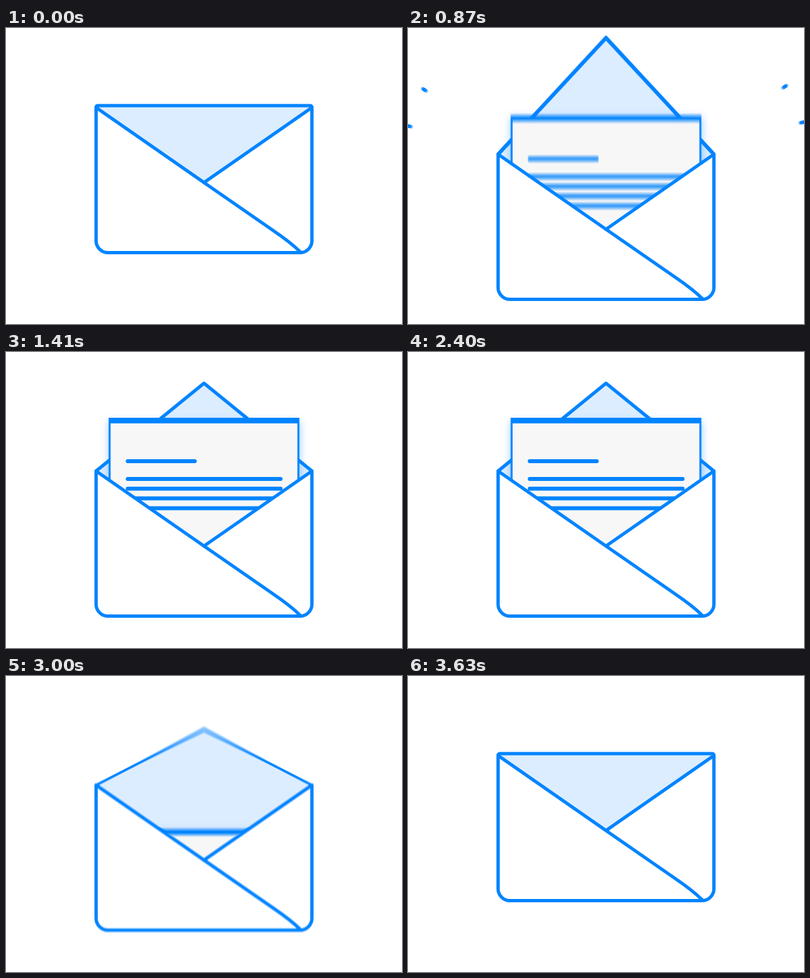
Recreate the animation shown at these times as an HTML page with a canvas. Size 600 by 450 pixels, loop 4.14 s.

```html
<!DOCTYPE html>
<html lang="en">
<head>
<meta charset="utf-8">
<title>Opening envelope</title>
<style>
  html, body { margin: 0; width: 100%; height: 100%; overflow: hidden; background: #fff; }
  canvas { display: block; width: 600px; height: 450px; }
</style>
</head>
<body>
<canvas id="stage" width="600" height="450"></canvas>
<script>
const LOOP = 4140, STEP = 30, SHUTTER = 15, SAMPLES = 12;
const BLUE = '#0084ff', LIGHT = [220, 237, 255], PAPER = '#f7f7f7';
const LEFT = 136.5, RIGHT = 463.5, HINGE = 121, FOLD = 235, BOTTOM = 341.5, RADIUS = 18;

const screen = document.getElementById('stage').getContext('2d');
const buffer = document.createElement('canvas');
buffer.width = 600;
buffer.height = 450;
const ctx = buffer.getContext('2d');

const clamp = v => Math.max(0, Math.min(1, v));
const smooth = u => u * u * (3 - 2 * u);

// Eased interpolation through [time, value] keys
function track(keys, t) {
  if (t <= keys[0][0]) return keys[0][1];
  for (let i = 1; i < keys.length; i++) {
    const [t0, a] = keys[i - 1], [t1, b] = keys[i];
    if (t < t1) return a + (b - a) * smooth((t - t0) / (t1 - t0));
  }
  return keys[keys.length - 1][1];
}

const envelopeKeys = [[0, 0], [367, -11], [867, 71], [1400, 60],
                      [2400, 60], [2812, 71], [3312, -11], [3630, 0]];
const flapKeys = [[420, -114], [885, 178], [1300, 133.5],
                  [2400, 133.5], [2815, 178], [3305, -114]];
const letterKeys = [[520, 260], [987, 30], [1400, 44],
                    [2400, 44], [2701, 30], [3168, 260]];

function stroke(width, color = BLUE) {
  ctx.lineWidth = width;
  ctx.strokeStyle = color;
  ctx.stroke();
}

function line(x1, y1, x2, y2, width) {
  ctx.beginPath();
  ctx.moveTo(x1, y1);
  ctx.lineTo(x2, y2);
  stroke(width);
}

function drawSparks(t) {
  const u = (t - 570) / 540;
  if (u <= 0 || u >= 1) return;
  const out = 1 - (1 - u) ** 3;
  const ray = (cy, side, slope, base) => {
    const n = Math.hypot(1, slope), dx = side / n, dy = -slope / n;
    const head = base + 220 * out, tail = head - 48 * (1 - out);
    line(300 + dx * tail, cy + dy * tail, 300 + dx * head, cy + dy * head, 5.5);
  };
  ray(270, -1, 0.64, 128);
  ray(268, 1, 0.66, 126);
  ray(215, -1, 0.22, 107);
  ray(209, 1, 0.22, 106);
}

function drawFlap(height) {
  const closed = clamp(-height / 114);
  const tint = closed > 0 ? 0.35 + 0.65 * closed : 1;
  ctx.fillStyle = `rgb(${LIGHT.map(c => 255 + (c - 255) * tint)})`;
  if (closed > 0) ctx.fillRect(LEFT, 118, RIGHT - LEFT, 4);
  ctx.save();
  ctx.translate(0, HINGE);
  ctx.scale(1, height / 133.5 || 0.001);
  ctx.beginPath();
  ctx.moveTo(LEFT, 0);
  ctx.lineTo(300, -133.5);
  ctx.lineTo(RIGHT, 0);
  ctx.fill();
  stroke(5);
  ctx.restore();
}

function drawTopEdge(height) {
  ctx.beginPath();
  ctx.moveTo(LEFT, 122);
  ctx.arcTo(LEFT, 118, 300, 118, 2.5);
  ctx.arcTo(RIGHT, 118, RIGHT, 122, 2.5);
  ctx.lineTo(RIGHT, 122);
  stroke(3 + 2 * clamp(-height / 114));
}

function drawLetter(top) {
  ctx.save();
  ctx.beginPath();
  ctx.rect(0, -200, 600, 500);
  ctx.clip();
  ctx.translate(0, top);
  ctx.shadowColor = 'rgba(0,132,255,.4)';
  ctx.shadowBlur = 12;
  ctx.shadowOffsetY = 6;
  ctx.fillStyle = BLUE;
  ctx.fillRect(155.5, -4, 289, 260);
  ctx.shadowColor = 'transparent';
  ctx.fillStyle = PAPER;
  ctx.fillRect(158.5, 4.5, 283, 252);
  line(184.5, 62, 286, 62, 6);
  for (let i = 0; i < 4; i++) line(184.5, 89 + i * 14.8, 416, 89 + i * 14.8, 6);
  ctx.restore();
}

function drawBody() {
  ctx.beginPath();
  ctx.moveTo(LEFT, HINGE);
  ctx.arcTo(LEFT, BOTTOM, 300, BOTTOM, RADIUS);
  ctx.arcTo(RIGHT, BOTTOM, RIGHT, HINGE, RADIUS);
  ctx.lineTo(RIGHT, HINGE);
  ctx.lineTo(300, FOLD);
  ctx.closePath();
  ctx.fillStyle = '#fff';
  ctx.fill();
  stroke(5);
  ctx.beginPath();
  ctx.moveTo(300, FOLD);
  ctx.lineTo(405, 308);
  ctx.quadraticCurveTo(432, 326.5, 446, 340.5);
  stroke(5);
}

function drawScene(t) {
  const flap = track(flapKeys, t);
  ctx.fillStyle = '#fff';
  ctx.fillRect(0, 0, 600, 450);
  ctx.lineCap = ctx.lineJoin = 'round';
  drawSparks(t);

  ctx.save();
  ctx.translate(0, track(envelopeKeys, t));
  if (flap >= 0) drawFlap(flap);
  ctx.beginPath();
  ctx.moveTo(LEFT, HINGE);
  ctx.lineTo(RIGHT, HINGE);
  ctx.lineTo(300, FOLD);
  ctx.fillStyle = `rgb(${LIGHT})`;
  ctx.fill();
  drawLetter(track(letterKeys, t));
  if (flap < 0) drawFlap(flap);
  drawBody();
  if (flap < 0) drawTopEdge(flap);
  ctx.restore();
}

// Averages several moments within the shutter to give motion blur
function render(t) {
  const moving = (t > 0 && t < 1410) || (t > 2400 && t < 3630);
  const count = moving ? SAMPLES : 1;
  for (let k = 0; k < count; k++) {
    drawScene(moving ? t + SHUTTER * ((k + 0.5) / count - 0.5) : t);
    screen.globalAlpha = 1 / (k + 1);
    screen.drawImage(buffer, 0, 0);
  }
}

const start = performance.now();
let shown = -1;
function tick() {
  const elapsed = (performance.now() - start) % LOOP;
  const t = Math.floor(elapsed / STEP) * STEP;
  if (t !== shown) render(shown = t);
  requestAnimationFrame(tick);
}
tick();
</script>
</body>
</html>
```
